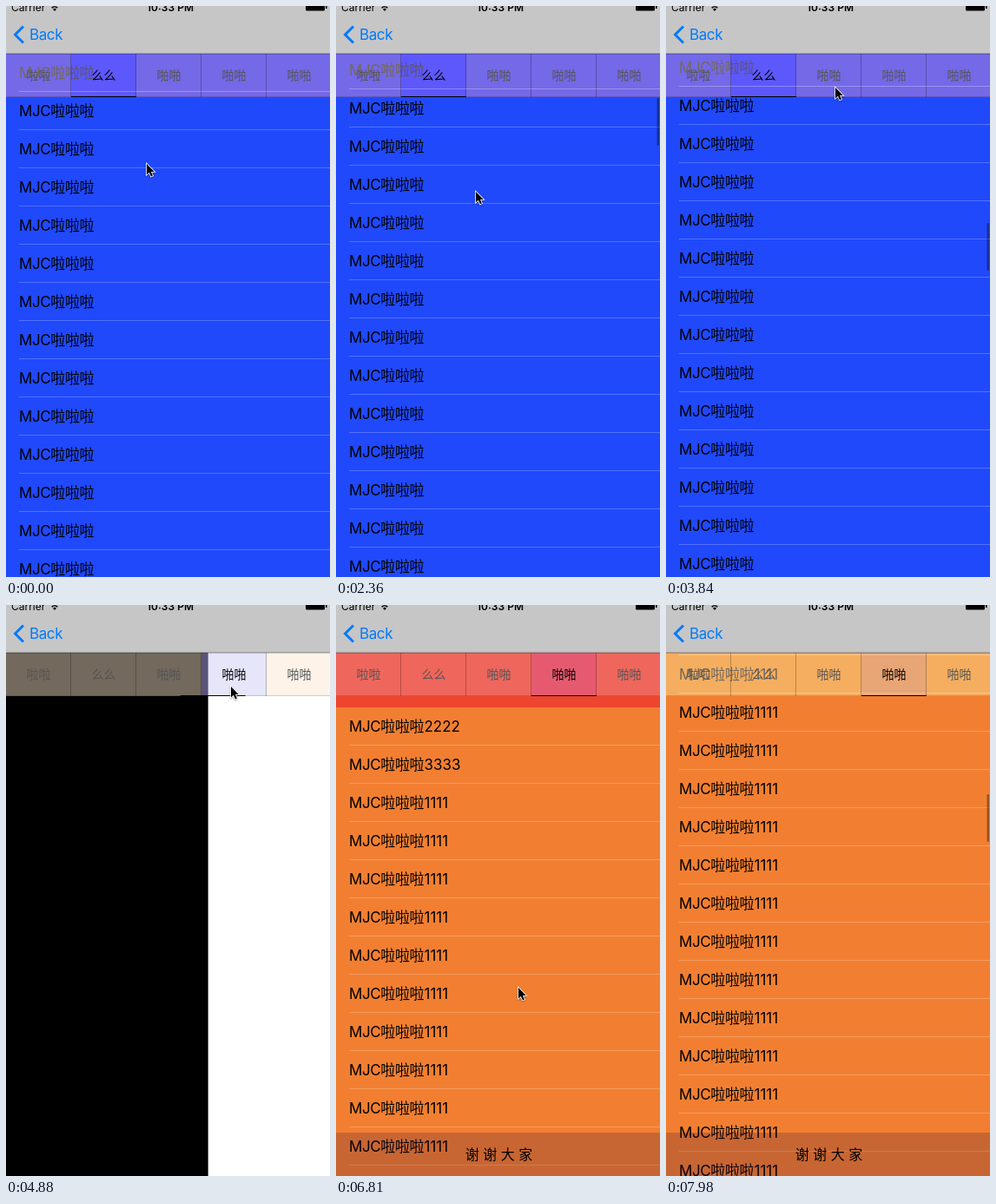
Recreate the animation shown at these times as an HTML page with a canvas. Size 373 px wide and 658 px high, loop 8000 ms.

```html
<!DOCTYPE html>
<html lang="zh">
<head>
<meta charset="utf-8">
<title>Tabs and lists</title>
<style>
html, body { margin: 0; width: 100%; height: 100%; overflow: hidden; background: #fff; }
canvas { display: block; width: 373px; height: 658px; }
</style>
</head>
<body>
<canvas id="stage"></canvas>
<script>
const W = 373, H = 658, LOOP = 8000;
const NAV = 55, BAR = 50, TAB = 75, ROW = 44, FOOT = 608;
const FONT = 'Inter, "Noto Sans CJK SC", "Noto Sans CJK", sans-serif';
const canvas = document.getElementById('stage');
const ctx = canvas.getContext('2d');
const ratio = window.devicePixelRatio || 1;
canvas.width = W * ratio;
canvas.height = H * ratio;

// Surface colours: plain, seen through the tab bar, seen through the selected tab.
const PLAIN = { red: '#ed452f', blue: '#2049fc', black: '#000', white: '#fff', orange: '#f27f31', ink: '#000', line: 'rgba(255,255,255,.22)' };
const BARRED = { red: '#ef665c', blue: '#7469e7', black: '#73695d', white: '#fef3e8', orange: '#f5ae5f', ink: '#73695d', line: 'rgba(255,255,255,.28)' };
const PICKED = { red: '#e65a70', blue: '#5d58fb', black: '#5b5477', white: '#e6e6fb', orange: '#e8a576', ink: '#5b5477', line: 'rgba(255,255,255,.28)' };

const TABS = ['啦啦', '么么', '啪啪', '啪啪', '啪啪'];
const FIRST_TAP = 4130, SECOND_TAP = 4880, BLACK_READY = 4570, ORANGE_READY = 5320;

// The picture moves only in these spans, about every 148 ms.
const STEP = 148;
const SPANS = [[150, 300], [590, 1630], [1770, 2790], [2940, 3980],
  [4130, 4580], [4880, 5330], [5770, 6810], [6950, 7980]];

// Each move: start, end, then where it arrives.
const POINTER = [[0, 300, 139, 286], [590, 1330, 143, 356], [1630, 2350, 160, 213],
  [2350, 2650, 180, 3], [2650, 3830, 194, 93], [4430, 4580, 258, 93],
  [5620, 6810, 209, 440], [6810, 7390, 295, 35], [7390, 7530, 400, 60]];
const BLUE_SCROLL = [[590, 1330, -41], [1330, 1770, 0], [2306, 3831, 1238]];
const ORANGE_SCROLL = [[5620, 6810, -63], [6810, 7980, 965]];
const tapMoves = length => [FIRST_TAP, SECOND_TAP].map((tap, i) => [tap - 125, tap - 125 + length, i + 2]);
const PAGING = tapMoves(300), MARKER = tapMoves(202);

function stepped(t) {
  const span = SPANS.filter(([start]) => start <= t).pop();
  if (!span) return 0;
  const [start, end] = span;
  const count = Math.round((end - start) / STEP);
  const gap = (end - start) / count;
  return start + Math.min(count, Math.floor((t - start + 5) / gap)) * gap;
}

function ease(t, start, end) {
  const p = Math.min(1, Math.max(0, (t - start) / (end - start)));
  return p * p * (3 - 2 * p);
}

const glide = (t, origin, moves) => moves.reduce(
  (at, [start, end, ...to]) => at.map((v, i) => v + (to[i] - v) * ease(t, start, end)), origin);

function rect(color, x, y, w, h) {
  ctx.fillStyle = color;
  ctx.fillRect(x, y, w, h);
}

function pill(color, x, y, w, h, r) {
  ctx.fillStyle = color;
  ctx.beginPath();
  ctx.roundRect(x, y, w, h, r);
  ctx.fill();
}

function label(text, x, y, size, color, { align = 'left', weight = 400, spacing = 0 } = {}) {
  ctx.font = `${weight} ${size}px ${FONT}`;
  ctx.textAlign = align;
  ctx.letterSpacing = spacing + 'px';
  ctx.fillStyle = color;
  ctx.fillText(text, x, y);
}

function clipped(x, y, w, h, draw) {
  ctx.save();
  ctx.beginPath();
  ctx.rect(x, y, w, h);
  ctx.clip();
  draw();
  ctx.restore();
}

function scrollMark(x, offset) {
  if (!offset) return;
  const y = 105.5 + offset * (offset > 0 ? .1167 : 1.1);
  const length = Math.max(0, 55 + Math.min(0, offset));
  pill('rgba(0,0,0,.36)', x + 369.5, y, 2.5, length, 1.25);
}

function list(x, offset, color, palette, suffix) {
  const top = NAV - offset;
  rect(palette.red, x, NAV, W, H - NAV);
  rect(palette[color], x, Math.max(NAV, top), W, H);
  for (let i = Math.max(0, Math.floor(offset / ROW)); top + i * ROW < H; i++) {
    const y = top + i * ROW;
    label('MJC啦啦啦', x + 15, y + 28, 17, palette.ink, { spacing: -.4 });
    label(suffix(i), x + 101.5, y + 28, 17, palette.ink);
    rect(palette.line, x + 15, Math.round(y + 43), W - 15, 1);
  }
  scrollMark(x, offset);
}

function pages(t, position, palette) {
  const at = index => (index - position) * W;
  rect(palette.white, 0, NAV, W, H - NAV);
  if (position < 2) list(at(1), glide(t, [0], BLUE_SCROLL)[0], 'blue', palette, () => '');
  if (t >= BLACK_READY && position < 3) rect(palette.black, at(2), NAV, W, H);
  if (t >= ORANGE_READY) {
    list(0, glide(t, [0], ORANGE_SCROLL)[0], 'orange', palette, i => ['2222', '3333'][i] || '1111');
  }
}

function tabBar(t, position) {
  const selected = t < FIRST_TAP ? 1 : t < SECOND_TAP ? 2 : 3;
  clipped(0, NAV, W, BAR, () => pages(t, position, BARRED));
  clipped(selected * TAB, NAV, TAB, BAR, () => pages(t, position, PICKED));
  const edge = 'rgba(0,0,0,.24)';
  rect('rgba(0,0,0,.16)', 0, NAV + BAR - 1, W, 1);
  TABS.forEach((name, i) => {
    if (i) rect(edge, i * TAB - 1, NAV, 1, BAR);
    label(name, i * TAB + 37.5, 85, 14, i === selected ? '#000' : '#555', { align: 'center' });
  });
  rect('#000', glide(t, [1], MARKER)[0] * TAB, NAV + BAR - 1, TAB, 1);
}

function wave(radius) {
  ctx.beginPath();
  ctx.arc(56, 6, radius, -2.3, -.84);
}

function navBar() {
  rect('#c6c6c6', 0, 0, W, NAV);
  rect('rgba(0,0,0,.4)', 0, NAV - .5, W, 1);
  label('Carrier', 6, 5.5, 12, '#000');
  label('10:33 PM', 189, 5.5, 12, '#000', { align: 'center', weight: 600 });
  ctx.strokeStyle = '#000';
  ctx.lineWidth = 1.6;
  wave(5);
  ctx.stroke();
  wave(3);
  ctx.lineTo(56, 6);
  ctx.fill();
  pill('#000', 345, -4, 22, 9.5, 1.5);
  rect('#000', 368, -1, 1.5, 4);
  ctx.strokeStyle = '#007aff';
  ctx.lineWidth = 3;
  ctx.stroke(new Path2D('M20 23.5L10.5 33 20 42.5'));
  label('Back', 27, 39, 17, '#007aff', { spacing: -.4 });
}

const ARROW = new Path2D('M0 0V15.5L3.6 12.2 6.2 18 8.7 16.9 6.2 11.3H11Z');

function pointer(x, y) {
  ctx.save();
  ctx.translate(x + 1, y + 1);
  ctx.scale(.8, .8);
  ctx.shadowColor = 'rgba(0,0,0,.35)';
  ctx.shadowBlur = 2;
  ctx.shadowOffsetY = 1;
  ctx.strokeStyle = '#fff';
  ctx.lineWidth = 2;
  ctx.stroke(ARROW);
  ctx.shadowColor = 'transparent';
  ctx.fillStyle = '#000';
  ctx.fill(ARROW);
  ctx.restore();
}

function draw(now) {
  const t = stepped(now % LOOP);
  const [position] = glide(t, [1], PAGING);
  ctx.setTransform(ratio, 0, 0, ratio, 0, 0);
  pages(t, position, PLAIN);
  if (t >= ORANGE_READY) {
    rect('rgba(30,0,60,.2)', 0, FOOT, W, H - FOOT);
    label('谢 谢 大 家', 187.5, 639, 16, '#000', { align: 'center' });
  }
  tabBar(t, position);
  navBar();
  pointer(...glide(t, [161, 181], POINTER));
}

const began = performance.now();
function tick() {
  draw(performance.now() - began);
  requestAnimationFrame(tick);
}
tick();
</script>
</body>
</html>
```
